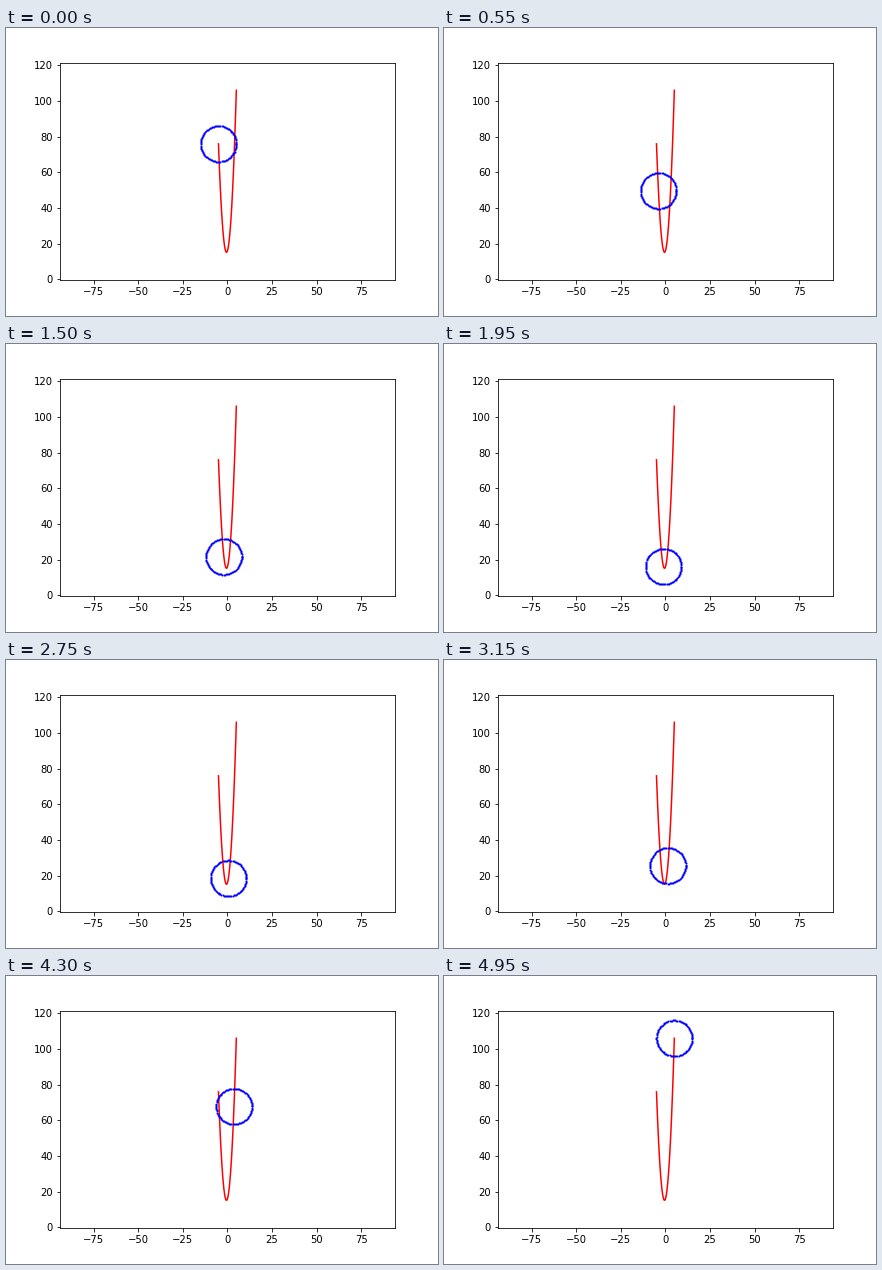
A matplotlib script that plays this animation: 432 by 288 pixels, repeating every 5000 ms.

```python
import numpy as np
import matplotlib.pyplot as plt
from matplotlib.animation import FuncAnimation

WIDTH, HEIGHT, DPI = 432, 288, 72
STEPS = 100
RADIUS = 10


def parabola(x):
    return 3 * x**2 + 3 * x + 16


fig = plt.figure(figsize=(WIDTH / DPI, HEIGHT / DPI), dpi=DPI, facecolor="white")
fig.subplots_adjust(left=0.125, right=0.9, bottom=0.125, top=0.88)
ax = fig.add_subplot()

xs = np.linspace(-5, 5, STEPS)
ys = parabola(xs)
angles = np.linspace(0, 2 * np.pi, 100)
ring_x, ring_y = RADIUS * np.cos(angles), RADIUS * np.sin(angles)

ax.plot(xs, ys, color="red", lw=1.5)
ring, = ax.plot([], [], "o", color="blue", ms=1, mew=1)

# Fit the whole path of the ring, with equal units on both axes
low, high = ys.min() - RADIUS, ys.max() + RADIUS
margin = 0.05 * (high - low)
low, high = low - margin, high + margin
box = ax.get_position()
half = (high - low) / 2 * (box.width * WIDTH) / (box.height * HEIGHT)
ax.set_xlim(-half, half)
ax.set_ylim(low, high)


def draw(i):
    ring.set_data(xs[i] + ring_x, ys[i] + ring_y)
    return ring,


anim = FuncAnimation(fig, draw, frames=STEPS, interval=50, repeat=True, repeat_delay=0)
plt.show()
```
